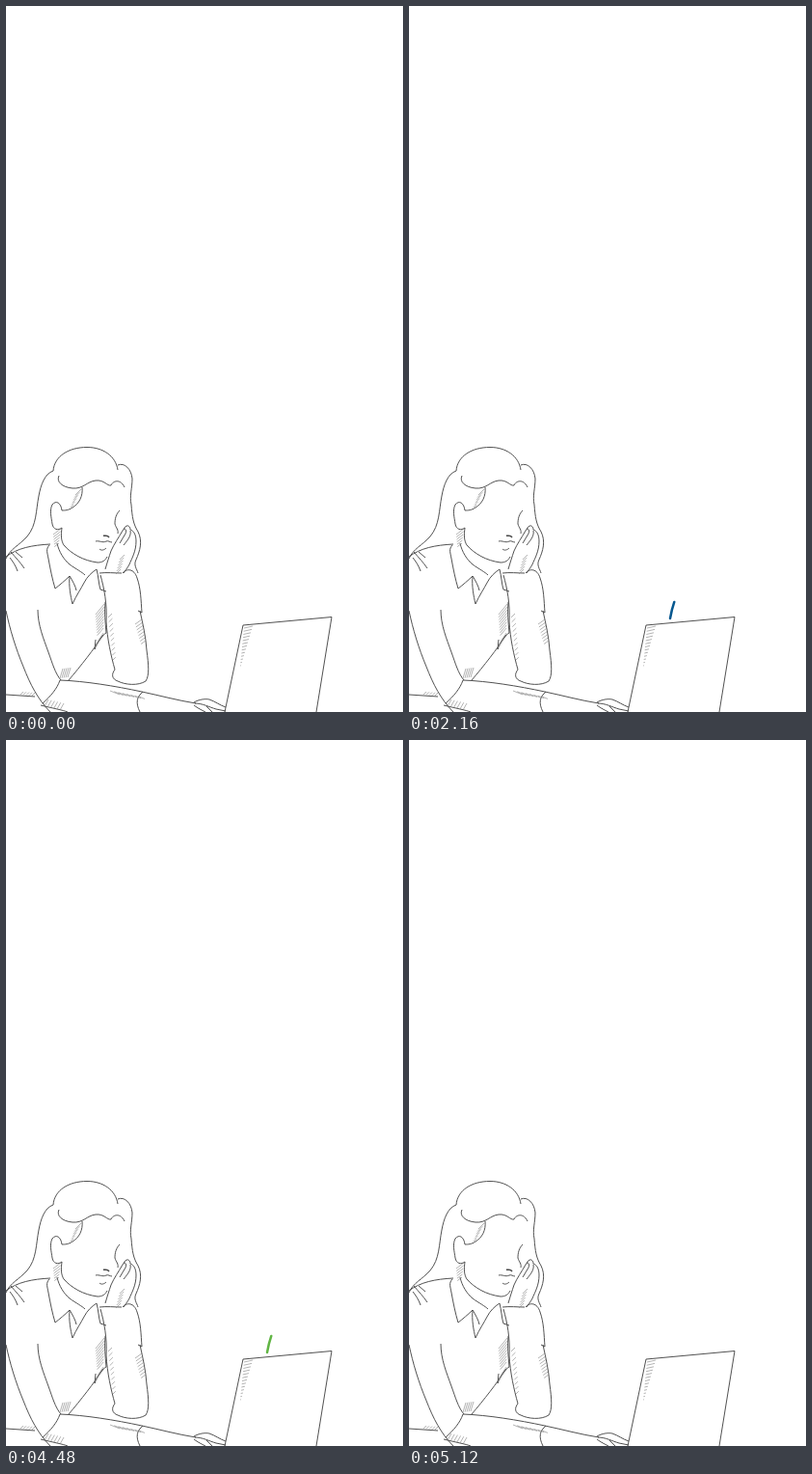
An HTML page with a canvas that plays this animation: 412x732 px, repeating every 6400 ms.

```html
<!DOCTYPE html>
<html lang="en">
<head>
<meta charset="utf-8">
<title>Sending mail</title>
<style>
html, body { margin: 0; width: 100%; height: 100%; overflow: hidden; background: #fff; }
canvas { display: block; }
</style>
</head>
<body>
<canvas id="stage" width="412" height="732"></canvas>
<script>
const ctx = document.getElementById('stage').getContext('2d');
const LOOP = 6400, STEP = 40, BURST = 640;
const BLUE = '#07588f', GREEN = '#61b544', INK = '#484848';

const bursts = [
  { start: 0, from: 40, main: BLUE, accent: GREEN, exitY: 461 },
  { start: 2160, from: 2160, main: GREEN, accent: BLUE, exitY: 470 },
  { start: 4480, from: 4480, main: BLUE, accent: GREEN, exitY: 461 }
];

const hair = [
  'M49 482C50 467 65 457.5 84 457.5C101 457.5 114 467 116 481',
  'M116 476C123 473 130 480 131 490C131 500 128 508 130 517C131 530 132 537 137 545C142 555 139 565 135 574C132 580 136 584 137 588',
  'M49 482C40 485 36 497 34 508C31 523 32 538 22 550C14 559 4 563 0 573',
  'M55 487C52 493 58 499 69 500C80 501 84 493 93 492C102 491 105 498 109 497C111 492 119 490 123 499',
  'M79 499C80 508 76 516 69 520C65 523 61 523 58 523'
];
const face = [
  'M58 523C57 515 52 512 48 517C45 523 47 530 48 537C49 543 54 544 58 541',
  'M58 541C57 549 57 554 60 559C68 568 80 575 95 577C100 577 103 575 105 571',
  'M118 523C114 527 113 532 113 537C114 541 117 543 116 547',
  'M93 555C97 554 100 557 104 555C106 554 108 556 110 556',
  'M97 563C99 565 102 564 104 562'
];
const hand = [
  'M103 584C105 577 107 571 109 565C112 558 117 551 121 544C123 540 126 543 124 547L118 557',
  'M122 543C124 537 129 538 129 543C133 544 135 549 135 555C135 565 131 572 128 579C126 583 123 586 122 588',
  'M129 544C130 549 127 553 122 559'
];
const clothes = [
  'M53 557C55 566 60 574 66 579C73 584 79 587 82 590',
  'M45 559C41 563 43 567 44 573C46 584 48 594 51 604C56 600 61 596 66 591C65 601 67 612 69 620C73 611 78 604 81 598',
  'M66 591C69 596 72 601 73 606',
  'M81 598C84 592 89 587 94 584C96 591 96 599 98 605L104 607',
  'M0 571C12 562 27 559 46 558',
  'M5 566C10 572 15 577 19 583M4 572C7 576 10 580 12 586M10 566L17 572',
  'M0 627C4 646 10 666 18 685C25 703 33 719 46 732',
  'M33 626C33 642 39 656 44 670C48 681 51 692 57 699',
  'M97 588C105 587 112 588 120 588',
  'M98 590C102 604 105 620 104 638C105 656 109 674 113 688C109 693 110 698 116 700C124 704 137 705 145 700C149 694 148 683 146 668C145 653 142 641 139 627',
  'M121 588C125 583 133 583 136 593C140 604 140 616 141 629L137 627',
  'M103 618C102 628 103 639 104 650C99 653 95 659 92 667L93 657',
  'M101 652C91 667 78 684 65 699',
  'M56 699C82 700 113 705 141 711C160 715 178 720 197 723',
  'M56 699C53 708 46 716 38 723',
  'M142 711C136 716 134 722 139 732',
  'M36 725C48 728 59 730 64 732'
];
const desk = [
  'M0 714L30 716',
  'M195 722C200 719 207 718 211 719C217 721 222 725 228 727',
  'M196 723C204 723 211 727 218 729L228 731',
  'M195 725C199 728 203 730 207 732M208 726L214 732'
];
const laptop = ['M227 732L246 642L338 633.5L322 732'];
const sketch = [...hair, ...face, ...hand, ...clothes, ...desk, ...laptop].map(d => new Path2D(d));
const nostril = new Path2D('M101 549C103 550 105 548 107 551');

// Each trail is a path with [time, distance] keys for its head and tail.
const trails = [
  { path: 'M257 620C257 611 258 602 260 595C266 578 275 565 288 553C302 541 317 533 335 527',
    head: [[40, 0], [200, 76], [360, 130]], tail: [[100, 0], [200, 25], [600, 130]] },
  { path: 'M271 635C275 612 284 597 295 586C308 573 325 562 343 556C368 548 394 545 420 544', accent: true,
    head: [[0, 17.5], [200, 112], [380, 192]], tail: [[0, 0], [200, 55], [600, 192]] },
  { path: 'M284 637C288 629 292 621 297 615C308 600 322 588 340 580C362 570 385 565 416 563',
    head: [[40, 0], [200, 81], [380, 162]], tail: [[100, 0], [200, 25], [600, 162]] }
].map(trail => ({ ...trail, path: new Path2D(trail.path) }));

function keyed(keys, t) {
  if (t <= keys[0][0]) return keys[0][1];
  for (let i = 1; i < keys.length; i++) {
    const [t0, v0] = keys[i - 1], [t1, v1] = keys[i];
    if (t < t1) return v0 + (v1 - v0) * (t - t0) / (t1 - t0);
  }
  return keys[keys.length - 1][1];
}

function line(x0, y0, x1, y1) {
  ctx.beginPath();
  ctx.moveTo(x0, y0);
  ctx.lineTo(x1, y1);
  ctx.stroke();
}

// Parallel strokes spread between two points, shortening toward the end.
function hatch(x0, y0, x1, y1, count, dx, dy, taper = 0) {
  for (let i = 0; i < count; i++) {
    const k = i / (count - 1), size = 1 - taper * k;
    const x = x0 + (x1 - x0) * k, y = y0 + (y1 - y0) * k;
    line(x, y, x + dx * size, y + dy * size);
  }
}

function drawSketch() {
  ctx.strokeStyle = INK;
  ctx.lineWidth = 0.95;
  sketch.forEach(path => ctx.stroke(path));
  ctx.lineWidth = 1.5;
  ctx.stroke(nostril);

  ctx.strokeStyle = '#808080';
  ctx.lineWidth = 0.6;
  hatch(78, 501, 70, 517, 6, -6, 6, 0.5);
  hatch(57, 542, 55, 557, 6, -8, 6, 0.4);
  hatch(123, 569, 119, 584, 6, -5, 5);
  hatch(102, 620, 101, 645, 9, -9, 11, 0.3);
  hatch(101, 650, 95, 660, 5, -4, 7);
  hatch(106, 634, 111, 678, 10, 4, -4, 0.3);
  hatch(141, 636, 145, 658, 8, -7, 5, 0.3);
  hatch(59, 687, 67, 686, 5, -3, 10);
  hatch(108, 710, 138, 716, 8, 10, 4, 0.4);
  hatch(40, 726, 56, 730, 6, 4, -7);
  hatch(18, 711, 30, 712, 5, -3, 3);
  hatch(247, 645, 243, 684, 13, 9, -2, 0.9);
}

function drawTrails(burst, t) {
  ctx.lineCap = 'round';
  ctx.lineWidth = 2.5;
  for (const trail of trails) {
    const head = keyed(trail.head, t), tail = keyed(trail.tail, t);
    if (head - tail < 1) continue;
    ctx.strokeStyle = trail.accent ? burst.accent : burst.main;
    ctx.setLineDash([head - tail, 1000]);
    ctx.lineDashOffset = -tail;
    ctx.stroke(trail.path);
  }
  ctx.setLineDash([]);
  ctx.lineCap = 'butt';
}

function drawEnvelope(burst, t) {
  const scale = keyed([[0, 0], [40, 0.2], [160, 1]], t);
  if (!scale) return;
  ctx.save();
  ctx.translate(
    keyed([[40, 283], [200, 367.5], [480, 455]], t),
    keyed([[40, 612], [200, 523.5], [480, burst.exitY]], t)
  );
  ctx.scale(scale, scale);
  ctx.fillStyle = burst.main;
  ctx.fillRect(-41, -31, 82, 62);
  ctx.strokeStyle = burst.main === BLUE ? '#173d5b' : '#37682a';
  ctx.lineWidth = 0.9;
  ctx.strokeRect(-40.5, -30.5, 81, 61);
  ctx.stroke(new Path2D('M-40 -30L-7 7Q-1 13 5 7L40 -30M-40 30L-11 3M40 30L10 3'));
  ctx.strokeStyle = 'rgba(255,255,255,.3)';
  ctx.lineWidth = 0.6;
  hatch(-38, -28, -25, -14, 6, 4, -1, 0.5);
  hatch(-38, 27, -29, 18, 5, 2, -4, 0.5);
  ctx.restore();
}

function draw(now) {
  const time = Math.floor((now % LOOP) / STEP) * STEP;
  ctx.fillStyle = '#fff';
  ctx.fillRect(0, 0, 412, 732);
  drawSketch();
  const burst = bursts.find(b => time >= b.from && time < b.start + BURST);
  if (burst) {
    drawTrails(burst, time - burst.start);
    drawEnvelope(burst, time - burst.start);
  }
}

function tick() {
  draw(performance.now() - origin);
  requestAnimationFrame(tick);
}

const origin = performance.now();
tick();
</script>
</body>
</html>
```
